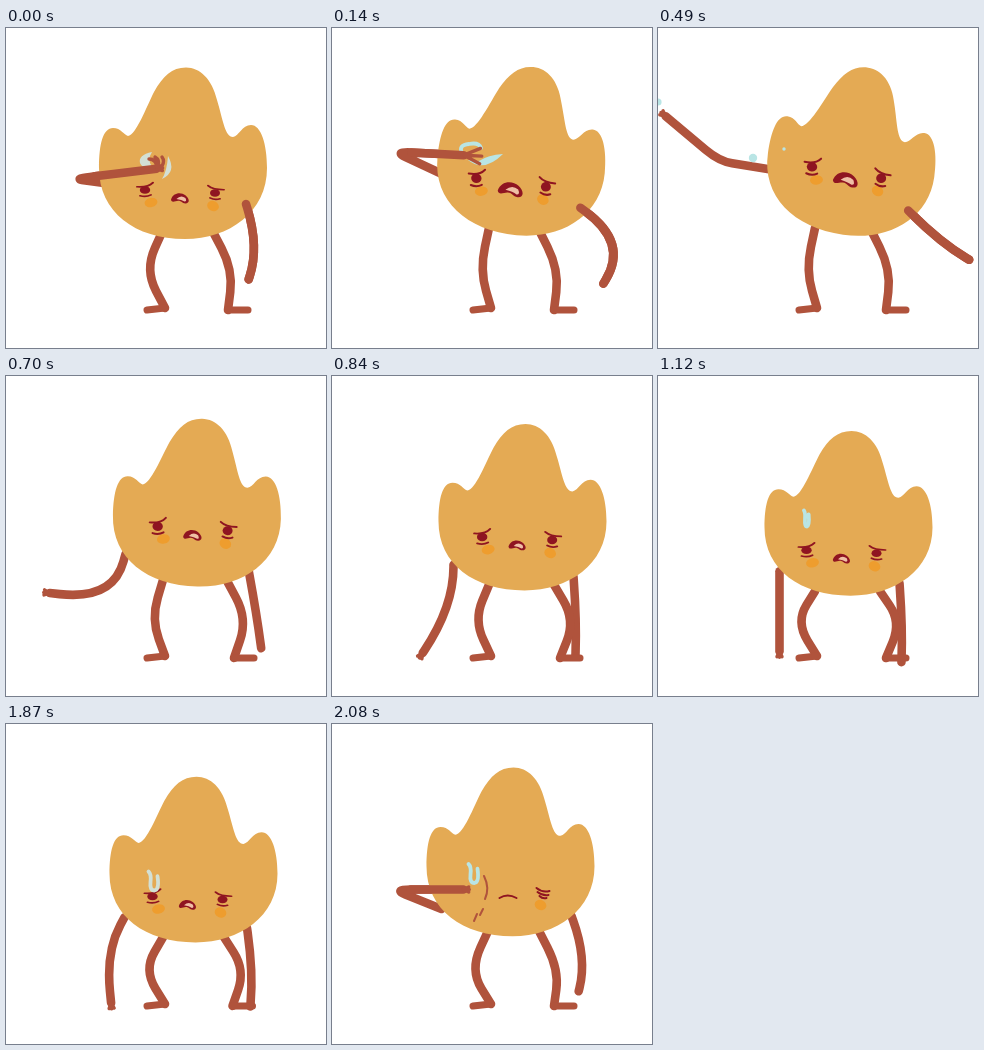
Animation of 320 by 320 pixels, one loop 2.15 s. Source, as an HTML page:

```html
<!DOCTYPE html>
<html lang="en">
<head>
<meta charset="utf-8">
<title>Tired flame</title>
<style>
  html, body { margin: 0; width: 100%; height: 100%; overflow: hidden; background: #fff; }
  svg { display: block; width: 100vw; height: 100vh; }
  .limb { fill: none; stroke: #b0533c; stroke-width: 8.6; stroke-linecap: round; stroke-linejoin: round; }
  .foot { stroke-width: 7; }
  .finger { stroke-width: 3.4; }
  .skin { fill: #e4aa54; }
  .line { fill: none; stroke: #8f1521; stroke-width: 2; stroke-linecap: round; stroke-linejoin: round; }
  .dark { fill: #8f1521; }
  .tongue { fill: #efbfa5; }
  .cheek { fill: #ee9d2e; }
  .water { fill: #b9e5e5; }
  .stream { fill: none; stroke: #b9e5e5; stroke-width: 3.8; stroke-linecap: round; stroke-linejoin: round; }
  .pale .water { fill: #d3e0d5; }
  .pale .stream { stroke: #d3e0d5; }
</style>
</head>
<body>
<svg viewBox="0 0 320 320">
  <path id="armBack" class="limb"/>
  <path id="fingersBack" class="limb finger"/>
  <path id="rightBack" class="limb"/>
  <path id="legL" class="limb"/><path id="footL" class="limb foot"/>
  <path id="legR" class="limb"/><path id="footR" class="limb foot"/>
  <path id="body" class="skin" d="M-82 42C-82 18-78 2-68 2C-60 2-57 9-53 10C-45 9-35-18-27-34
    C-18-50-9-58.5 5-58.5C19-58.5 31-47 36-26C42-6 44 11 52 11C58 10 61-1 70-1
    C80-1 86 18 86 42C86 86 48 113 4 113C-46 113-82 86-82 42Z"/>

  <g id="face">
    <ellipse id="cheekL" class="cheek" cx="-29" cy="4.5" rx="6.5" ry="4.7" transform="rotate(-12 -29 4.5)"/>
    <ellipse class="cheek" cx="33" cy="8" rx="6" ry="5" transform="rotate(25 33 8)"/>
    <g id="eyeL">
      <ellipse class="dark" rx="5.2" ry="4.7"/>
      <path class="line" d="M-8-4Q3-3 8-9M-5 7Q1 9 6 6"/>
    </g>
    <g id="eyeR">
      <ellipse class="dark" rx="5" ry="4.7"/>
      <path class="line" d="M-7-9Q-2-4 9-4M-5 6Q0 9 5 7"/>
    </g>
    <path id="squint" class="line" d="M29-9Q35-4 42-6M30-5Q35-1 41-2M32-1Q35 2 39 1"/>
    <g id="mouth">
      <path class="dark" d="M-10 2C-8-6 1-7 6-3C11 1 11 6 6 6C2 6 2 3-2 3C-5 3-9 6-10 2Z"/>
      <path class="tongue" d="M-4 1Q1-4 6 0Q8 4 5 4Q2 2-4 1Z"/>
    </g>
    <path id="frown" class="line" d="M-8 1Q0-4 9 1"/>
  </g>

  <g id="sweat">
    <path id="smear" class="water" d="M146 124Q132 127 134 135Q137 142 147 139Q140 133 146 124ZM162 128Q171 144 156 151Q161 143 162 128Z"/>
    <g id="swoosh">
      <path class="stream" d="M130 125Q126 117 137 116Q147 114 149 120"/>
      <path class="water" d="M136 132Q152 145 171 126Q156 127 147 133Z"/>
    </g>
    <g id="drops" class="water">
      <circle r="3.6"/><circle r="4.2"/><circle r="1.7"/>
    </g>
    <path id="drip" class="stream"/>
  </g>

  <path id="armFront" class="limb"/>
  <path id="fingersFront" class="limb finger"/>
  <path id="knuckles" class="limb finger" d="M143 131q7 0 8 8M149 129q5 3 3 9M156 129q3 4 0 9"/>
  <path id="folds" class="line" style="stroke:#b0533c" d="M152 152Q158 164 153 175M151 185L148 191M145 190L142 197"/>
  <path id="rightFront" class="limb"/>
</svg>

<script>
const STEP = 70, LOOP = 2150, REST_END = 1870, REST_STEP = 20;
const $ = Object.fromEntries([...document.querySelectorAll('[id]')].map(e => [e.id, e]));

const mix = (a, b, p) => a + (b - a) * p;
const ramp = (n, from, to) => Math.min(1, Math.max(0, (n - from) / (to - from)));
const ease = (n, from, to) => { const p = ramp(n, from, to); return p * p * (3 - 2 * p); };
const mixPoint = (a, b, p) => [mix(a[0], b[0], p), mix(a[1], b[1], p)];

function polar([x, y], degrees, length) {
  const a = degrees * Math.PI / 180;
  return [x + length * Math.cos(a), y + length * Math.sin(a)];
}

const show = (id, on) => $[id].style.display = on ? '' : 'none';
const draw = (id, d) => $[id].setAttribute('d', d);
const move = (el, value) => el.setAttribute('transform', value);

// A limb from start to end; soft 0 is a sharp joint, 1 a full curve.
function limb(start, joint, end, soft, lowerOnly) {
  const into = mixPoint(joint, start, soft), out = mixPoint(joint, end, soft);
  const upper = lowerOnly ? `M${out}` : `M${start}L${into}Q${joint} ${out}`;
  return `${upper}L${end}`;
}

const fingers = (hand, angle, length) => [-25, 0, 25].map(spread =>
  `M${hand}L${polar(hand, angle + spread, length)}`).join('');

// The acting: lean into the wipe, throw the arms, drop and slump, then lift again.
const acting = n => ({
  lean: ease(n, 0, 2),
  toss: ease(n, 2, 6),
  drop: ease(n, 7, 11),
  lag: ease(n, 8, 14),
  slump: ease(n, 7, 16),
  grow: ease(n, 14, 20),
  lift: ramp(n, 20, 24)
});

function placeBody({ lean, toss, drop, slump, grow, lift }) {
  return {
    x: 175 + 16 * lean + 6 * toss - 8.5 * drop - 12 * lift,
    y: 98 - 2 * lean + 15 * slump + grow - 11 * lift,
    tilt: 5.4 * lean + 2.8 * toss - 8.2 * drop,
    height: 1 - .015 * lean - .025 * slump + .025 * lift
  };
}

function onBody({ x, y, tilt }, dx, dy) {
  const [px, py] = polar([x, y], tilt, dx);
  return polar([px, py], tilt + 90, dy);
}

function drawLeftArm(body, { lean, toss, drop, lag, slump, lift }, front) {
  const low = slump - lift;
  const shoulder = onBody(body, -77 + 10 * drop, 57 + 27 * drop);
  const elbow = polar(shoulder, 188 + 17 * lean - 16 * toss - 99 * drop + 112 * lift,
    30 + 22 * lean - 17 * low);
  const foreAngle = 353 + 10 * lean - 143 * toss - 130 * lag - 90 * lift * lift;
  const hand = polar(elbow, foreAngle, 83 - 13 * lean - 25 * low);
  const soft = .25 + .7 * (drop - lift);
  const digits = fingers(hand, foreAngle, 6 + 12 * (lean - toss));
  draw('armBack', limb(shoulder, elbow, hand, soft));
  draw('armFront', limb(shoulder, elbow, hand, soft, true));
  draw('fingersBack', digits);
  draw('fingersFront', digits);
  show('armFront', front);
  show('fingersFront', front);
}

function drawRightArm(body, { lean, toss, drop, lift }, front) {
  const stretch = 14 * (lean - toss);
  const shoulder = onBody(body, 65 - 12 * drop + 10 * lift, 78 + 18 * drop - 5 * lift);
  const elbow = polar(shoulder, 73 - 37 * lean + 9 * toss + 41 * drop - 16 * lift, 45 + stretch);
  const hand = polar(elbow, 108 + 13 * lean - 90 * toss + 61 * drop + 12 * lift, 34 + stretch);
  const d = limb(shoulder, elbow, hand, .9);
  draw('rightBack', d);
  draw('rightFront', d);
  show('rightFront', front);
}

function drawLegs({ y }, { lean, toss, drop, slump, lift }) {
  const hipY = y + 104, kneeY = 242 + 4 * slump;
  const hipR = 206 + 6 * toss + 10 * drop - 16 * lift;
  const heelR = 222 + 6 * toss - 6 * lift;
  const leg = (side, hip, knee, heel, toe) => {
    draw('leg' + side, limb([hip, hipY], [knee, kneeY], heel, .55));
    draw('foot' + side, `M${heel}L${toe}`);
  };
  leg('L', 157, 139 + 9 * lean - 10 * slump, [159, 280], [141, 282]);
  leg('R', hipR, hipR + 21, [heelR, 282], [heelR + 20, 282]);
}

function drawFace(body, { lean, toss, drop, slump, lift }, shut) {
  const x = body.x - 1 - body.tilt - 6 * (lean - toss) - 4 * (slump - lift);
  const y = body.y + 72 - 7 * lean - 10 * toss + 16 * slump + lift;
  const eye = .82 + .2 * (lean - slump);
  move($.face, `translate(${x} ${y}) rotate(${.85 * body.tilt})`);
  move($.eyeL, `translate(-35 -8) scale(1 ${eye})`);
  move($.eyeR, `translate(35 -5) scale(1 ${eye})`);
  move($.mouth, `scale(${.9 + .37 * lean - .4 * drop})`);
  for (const id of ['eyeL', 'eyeR', 'cheekL', 'mouth']) show(id, !shut);
  for (const id of ['squint', 'frown']) show(id, shut);
  return { x, y };
}

function drawSweat(n, face, { grow }) {
  $.sweat.classList.toggle('pale', n === 0 || n === 21);
  show('smear', n === 0);
  show('swoosh', n === 1 || n === 2);
  show('drops', n >= 3 && n <= 8);
  show('drip', n >= 14);

  const fly = (n - 3) / 4;
  const paths = [[[118, 98], [0, 74]], [[132, 118], [95, 130]], [[146, 122], [126, 121]]];
  paths.forEach(([from, to], i) =>
    move($.drops.children[i], `translate(${mixPoint(from, to, fly)})`));

  const w = .35 + .65 * grow, h = .75 + .2 * grow;
  draw('drip', `M${face.x - 37 - 2 * grow} ${face.y - 53 + 20 * grow}
    q${3 * w} ${3 * h} ${2 * w} ${11 * h}q${-w} ${9 * h} ${4 * w} ${9 * h}q${5 * w} ${-h} ${3 * w} ${-15 * h}`);
}

function pose(n) {
  const act = acting(n), body = placeBody(act);
  move($.body, `translate(${body.x} ${body.y}) rotate(${body.tilt}) scale(1 ${body.height})`);
  drawLegs(body, act);
  drawLeftArm(body, act, n <= 2 || n >= 23);
  drawRightArm(body, act, n <= 8);
  drawSweat(n, drawFace(body, act, n === 24), act);
  show('knuckles', n === 0);
  show('folds', n === 24);
}

let last = -1;
function tick() {
  const t = performance.now() % LOOP;
  const n = t < REST_END
    ? Math.min(REST_STEP, Math.floor(t / STEP))
    : REST_STEP + 1 + Math.floor((t - REST_END) / STEP);
  if (n !== last) pose(last = n);
  requestAnimationFrame(tick);
}
tick();
</script>
</body>
</html>
```
